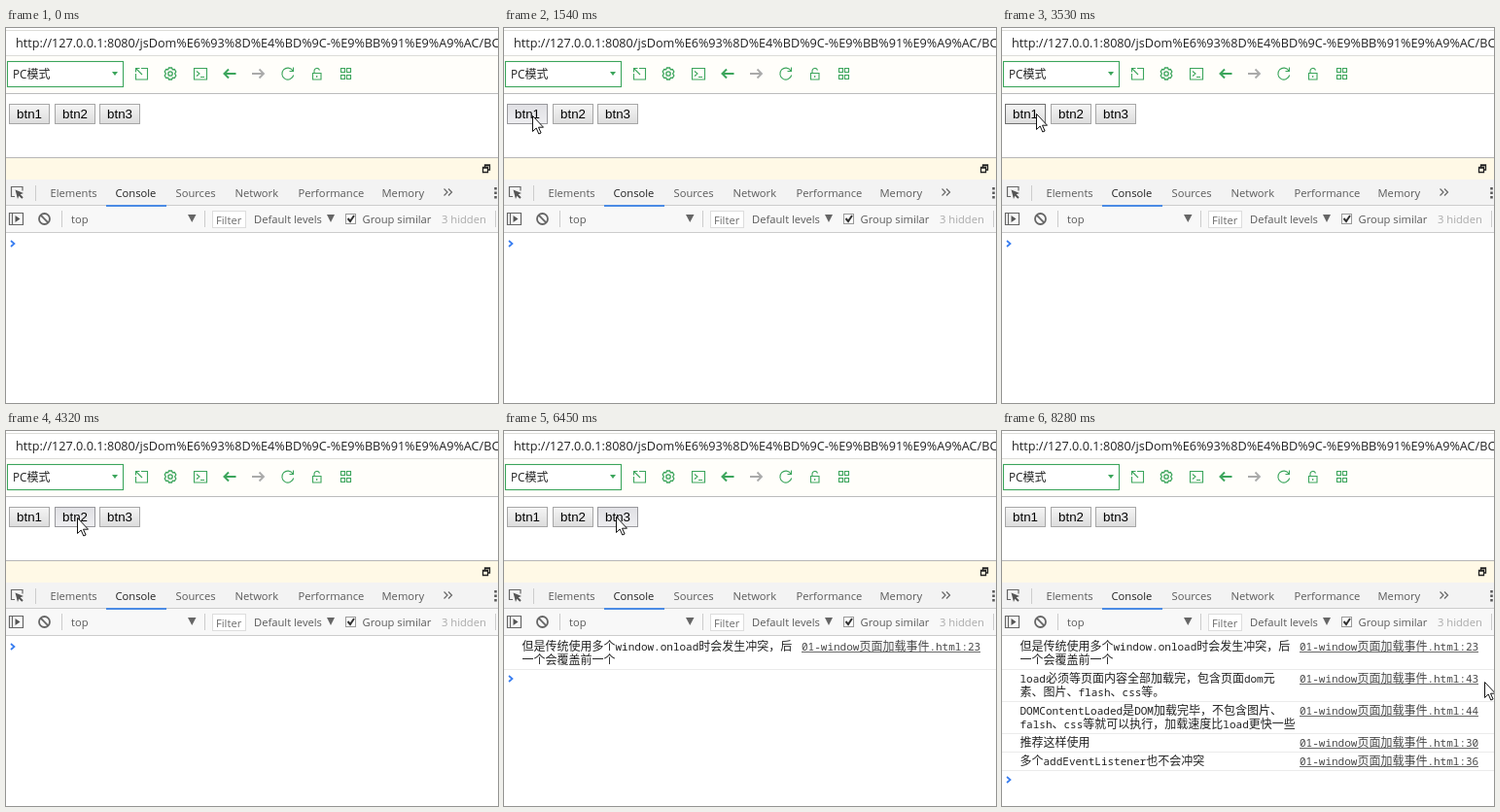
Animation, 506 px wide and 386 px high, one loop 9.1 s. Source, as an HTML page:

```html
<!DOCTYPE html>
<html lang="zh-CN">
<head>
<meta charset="utf-8">
<title>window load events</title>
<style>
  html, body { margin: 0; width: 100%; height: 100%; overflow: hidden; background: #fff; }
  svg { display: block; width: 506px; height: 386px; }
  .ui { font: 11.2px "Open Sans", "Noto Sans", sans-serif; fill: #5a5a5a; }
  .cjk { font: 12px "Noto Sans CJK SC", "Noto Sans CJK", sans-serif; fill: #222; }
  .mono { font: 11px "Noto Sans Mono", "DejaVu Sans Mono", monospace; }
  .link { fill: #484848; }
  .btn { font: 13.33px "Liberation Sans", Arial, sans-serif; text-anchor: middle; fill: #000; }
  .green { fill: none; stroke: #3ca55c; stroke-width: 1.1; }
  .grey { fill: none; stroke: #666; stroke-width: 1.2; }

  .timed { animation: 9100ms step-end infinite; opacity: 0; }
  #hover1 { animation-name: hover1; }
  #press1 { animation-name: press1; }
  #hover2 { animation-name: hover2; }
  #press2 { animation-name: press2; }
  #hover3 { animation-name: hover3; }
  #press3 { animation-name: press3; }
  #first { animation-name: first; }
  #rest { animation-name: rest; }
  #prompt { animation: prompt 9100ms step-end infinite; }
  #cursor { animation: cursor 9100ms step-end infinite; }

  @keyframes hover1 { 0% { opacity: 0 } 7.4% { opacity: 1 } 39.6% { opacity: 0 } }
  @keyframes press1 { 0% { opacity: 0 } 16.044% { opacity: 1 } 30.989% { opacity: 0 } }
  @keyframes hover2 { 0% { opacity: 0 } 39.7% { opacity: 1 } 59.4% { opacity: 0 } }
  @keyframes press2 { 0% { opacity: 0 } 47.473% { opacity: 1 } 56.813% { opacity: 0 } }
  @keyframes hover3 { 0% { opacity: 0 } 59.8% { opacity: 1 } 83.25% { opacity: 0 } }
  @keyframes press3 { 0% { opacity: 0 } 69.011% { opacity: 1 } 82.857% { opacity: 0 } }
  @keyframes first { 0% { opacity: 0 } 56.813% { opacity: 1 } }
  @keyframes rest { 0% { opacity: 0 } 82.857% { opacity: 1 } }
  @keyframes prompt {
    0% { transform: translateY(0) }
    56.813% { transform: translateY(33px) }
    82.857% { transform: translateY(137px) }
  }
  @keyframes cursor {
    0% { opacity: 0; transform: translate(480px, 378px) }
    .769% { opacity: 1; transform: translate(480px, 378px); animation-timing-function: steps(2) }
    1.703% { opacity: 1; transform: translate(460px, 338px); animation-timing-function: steps(2) }
    2.637% { opacity: 1; transform: translate(427px, 268px); animation-timing-function: steps(2) }
    3.571% { opacity: 1; transform: translate(380px, 215px); animation-timing-function: steps(2) }
    4.505% { opacity: 1; transform: translate(250px, 112px); animation-timing-function: steps(4) }
    6.374% { opacity: 1; transform: translate(80px, 108px); animation-timing-function: steps(4) }
    8.242% { opacity: 1; transform: translate(28px, 89px) }
    35.604% { opacity: 1; transform: translate(28px, 89px); animation-timing-function: steps(3) }
    37.033% { opacity: 1; transform: translate(33px, 87px) }
    38.791% { opacity: 1; transform: translate(34px, 87px); animation-timing-function: steps(4) }
    40.659% { opacity: 1; transform: translate(72px, 88px) }
    58.022% { opacity: 1; transform: translate(72px, 88px); animation-timing-function: steps(5) }
    60.33% { opacity: 1; transform: translate(114px, 87px) }
    82.857% { opacity: 1; transform: translate(114px, 87px); animation-timing-function: steps(5) }
    84.945% { opacity: 1; transform: translate(325px, 111px); animation-timing-function: steps(5) }
    87.143% { opacity: 1; transform: translate(420px, 165px); animation-timing-function: steps(9) }
    90.989%, 100% { opacity: 1; transform: translate(495px, 257px) }
  }
</style>
</head>
<body>
<svg viewBox="0 0 506 386">
  <defs>
    <linearGradient id="up" x2="0" y2="1"><stop stop-color="#f5f5f5"/><stop offset="1" stop-color="#dcdcdc"/></linearGradient>
    <linearGradient id="down" x2="0" y2="1"><stop stop-color="#e0e0e4"/><stop offset="1" stop-color="#ededf0"/></linearGradient>
  </defs>
  <rect width="506" height="386" fill="#fff"/>

  <!-- address bar -->
  <path d="M0 2.5H506M0 28.5H506" stroke="#dcdcd8"/>
  <text class="ui" x="10" y="20" style="font-size:12.65px;fill:#222">http://127.0.0.1:8080/jsDom%E6%93%8D%E4%BD%9C-%E9%BB%91%E9%A9%AC/BC</text>

  <!-- browser toolbar -->
  <rect y="29" width="506" height="38" fill="#fffefa"/>
  <path d="M0 67.5H506" stroke="#bcbcbc"/>
  <rect class="green" x="1.5" y="34.5" width="119" height="26" style="fill:#fff"/>
  <text class="cjk" x="7" y="52"><tspan class="ui" style="font-size:11.8px;fill:#222">PC</tspan>模式</text>
  <path d="M109 45h6l-3 4z" fill="#3ca55c"/>
  <g class="green">
    <path d="M139 41.5h6.5v11.5h-12v-6M133.500 45.5v-4h4M134 42l6 6"/>
    <path d="M167.500 41h3l.8 1.800 2-.3 1.500 2.500-1.200 2 1.200 2-1.500 2.500-2-.3-.8 1.800h-3l-.8-1.800-2 .3-1.500-2.500 1.200-2-1.200-2 1.500-2.500 2 .3z" stroke-width="1.300"/>
    <circle cx="169" cy="47" r="2.200" stroke-width="1.300"/>
    <path d="M193.500 41.500h13v11.500h-13zM196 44.500l3 2.500-3 2.500M200 50.500h4"/>
    <path d="M225 47h11.500M229 42.500l-4.500 4.500 4.500 4.500" stroke-width="2"/>
    <path d="M253 47h11.500M260.500 42.500l4.500 4.500-4.500 4.500" stroke="#aaa" stroke-width="1.800"/>
    <path d="M295 44a6 6 0 1 0 .7 4.500M295.500 40.500v4h-4"/>
    <path d="M315.500 46.500h8.500v6.500h-8.500zM317 46.500v-2.500a2.800 2.800 0 0 1 5.500-.5M319.700 49v2"/>
    <path d="M344.500 41.500h4v4h-4zM350.500 41.500h4v4h-4zM344.500 48.500h4v4h-4zM350.500 48.500h4v4h-4z"/>
  </g>

  <!-- page -->
  <g id="buttons"></g>
  <path d="M0 133.500H506" stroke="#b6b6b6"/>

  <!-- devtools -->
  <rect y="134" width="506" height="22" fill="#fff9e6"/>
  <path d="M492.500 143v-2h5v5h-2M490.500 143.500h5v5h-5zM490 144h6M492 141.500h6" fill="none" stroke="#222" stroke-width="1.300"/>
  <rect y="156" width="506" height="27" fill="#f3f3f3"/>
  <rect y="183" width="506" height="27" fill="#f8f8f8"/>
  <path d="M0 182.500H506M0 210.500H506" stroke="#ccc"/>
  <rect x="103" y="182" width="62" height="2" fill="#4b8be4"/>
  <path class="grey" d="M9 173.500H5.500v-10h11.500v4"/>
  <path d="M9.500 166.500l8.500 3.500-3.300 1.300 3 3-1.400 1.400-3-3-1.300 3.300z" fill="#555"/>
  <path d="M30.500 162v16" stroke="#ccc"/>
  <g class="ui" id="tabs"></g>
  <path class="grey" d="M450.500 165.500l3.500 3.500-3.500 3.500M455 165.500l3.500 3.500-3.500 3.500" stroke-width="1.500"/>
  <path d="M503.500 164v2.500M503.500 168.500v2.500M503.500 173v2.500" stroke="#555" stroke-width="2.500"/>

  <path class="grey" d="M3.500 190.500h14v12h-14zM6.500 190.500v12"/>
  <path d="M9.500 193l5 3.500-5 3.500z" fill="#555"/>
  <circle class="grey" cx="39.500" cy="196.500" r="5.500" style="stroke-width:1.800"/>
  <path class="grey" d="M35.700 192.700l7.600 7.600" style="stroke-width:1.800"/>
  <path d="M57.500 188v17M204.500 188v17M503.500 188v17" stroke="#ccc"/>
  <path d="M187 192h8.500l-4.250 8zM330 192h8l-4 8z" fill="#666"/>
  <rect x="212.500" y="188.500" width="34" height="17" fill="#fff" stroke="#ddd"/>
  <rect x="349.500" y="191.500" width="10" height="10" fill="#fff" stroke="#999"/>
  <path d="M351.500 196l2.500 3 4-6" fill="none" stroke="#333" stroke-width="2"/>
  <g class="ui" id="filters"></g>

  <!-- console -->
  <g id="first" class="timed"></g>
  <g id="rest" class="timed"></g>
  <path id="prompt" d="M5 219l3.500 3-3.500 3" fill="none" stroke="#367cf1" stroke-width="1.700"/>

  <path id="cursor" d="M1.500 1.500v16l3.700-3.500 2.600 6 2.300-1-2.600-5.800h5z" fill="#fff" stroke="#111"/>
</svg>
<script>
  const byId = id => document.getElementById(id);

  const label = ([x, text, fill = '#5a5a5a'], y) => `<text x="${x}" y="${y}" style="fill:${fill}">${text}</text>`;
  byId('tabs').innerHTML = [
    [45.5, 'Elements'], [112.5, 'Console', '#222'], [174.5, 'Sources'],
    [235.5, 'Network'], [300.5, 'Performance'], [386.5, 'Memory'],
  ].map(item => label(item, 174)).join('');
  byId('filters').innerHTML = [
    [67, 'top'], [255, 'Default levels'], [366.5, 'Group similar'], [448, '3 hidden', '#aaa'],
  ].map(item => label(item, 201)).join('') + label([216, 'Filter', '#6c6c6c'], 202);

  const box = (x, fill, stroke, attrs = '') =>
    `<rect x="${x + .5}" y="78.5" width="41" height="20" fill="url(#${fill})" stroke="${stroke}" ${attrs}/>`;
  byId('buttons').innerHTML = [3, 50, 96].map((x, i) => {
    const n = i + 1;
    return box(x, 'up', '#a6a6a6')
      + box(x, 'up', '#707070', `id="hover${n}" class="timed"`)
      + box(x, 'down', '#98989c', `id="press${n}" class="timed"`)
      + `<text class="btn" x="${x + 21}" y="93">btn${n}</text>`;
  }).join('');

  // Latin runs are set in the monospace face, the rest in the CJK face.
  const mixed = text => text.replace(/[\x20-\x7e]+/g, run => `<tspan class="mono">${run}</tspan>`);
  const message = (y, lines) =>
    lines.map((text, i) => `<text class="cjk" x="18.5" y="${y + i * 14}">${mixed(text)}</text>`).join('')
    + `<path d="M0 ${y + lines.length * 14 - 8.5}H506" stroke="#ebebeb"/>`;
  const link = (y, row) =>
    `<text class="cjk link" x="306" y="${y}">${mixed('01-window页面加载事件.html:' + row)}</text>`
    + `<path d="M306 ${y + 1.5}h184" stroke="#666"/>`;
  const entry = (y, row, ...lines) => message(y, lines) + link(y, row);

  byId('first').innerHTML = entry(226, 23, '但是传统使用多个window.onload时会发生冲突，后', '一个会覆盖前一个');
  byId('rest').innerHTML =
    entry(259, 43, 'load必须等页面内容全部加载完，包含页面dom元', '素、图片、flash、css等。')
    + entry(292, 44, 'DOMContentLoaded是DOM加载完毕，不包含图片、', 'falsh、css等就可以执行，加载速度比load更快一些')
    + entry(325, 30, '推荐这样使用')
    + entry(344, 36, '多个addEventListener也不会冲突');
</script>
</body>
</html>
```
